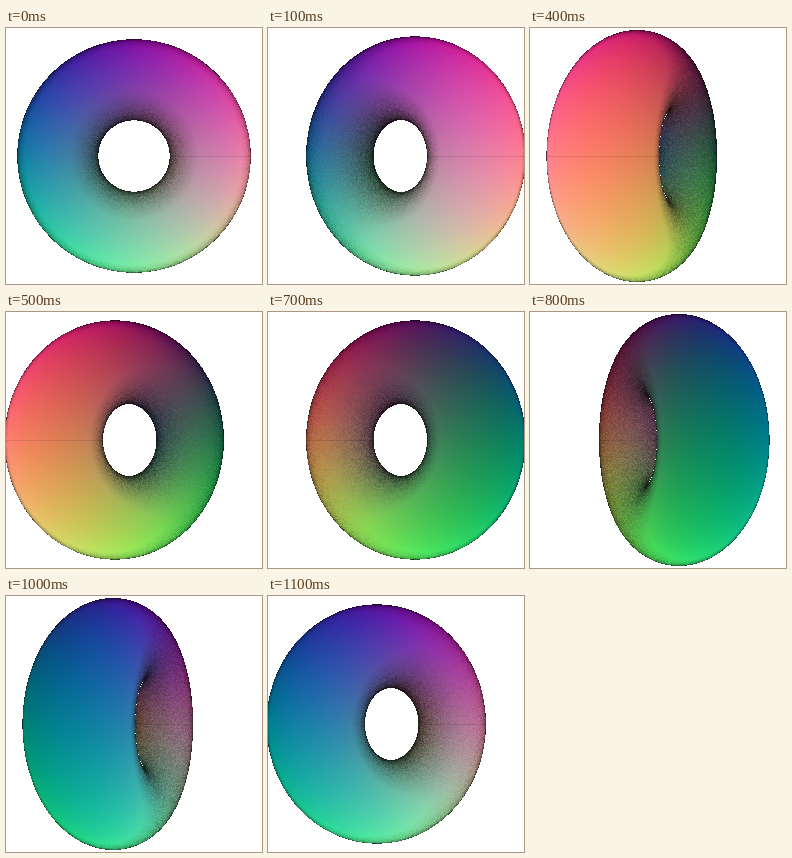
Write an HTML page with a canvas that moves like this. It is 256 px wide and 256 px high and loops after 1200 ms.

```html
<!DOCTYPE html>
<html lang="en">
<head>
<meta charset="utf-8">
<title>Turning torus</title>
<style>
  html, body { margin: 0; width: 100%; height: 100%; overflow: hidden; background: #fff; }
  canvas { display: block; width: 256px; height: 256px; }
</style>
</head>
<body>
<canvas id="stage" width="256" height="256"></canvas>
<script>
const SIZE = 256, STEPS = 12, STEP_MS = 100;
const FOCAL = 222, CAMERA = 3, TUBE = 0.51, REACH = 1.5;
const ctx = document.getElementById('stage').getContext('2d');
const poses = [];

function seeded(seed) {
  return () => {
    seed = (Math.imul(seed, 1664525) + 1013904223) >>> 0;
    return seed / 4294967296;
  };
}

// Map a coordinate within the torus to a colour channel.
const channel = v => 255 * Math.min(1, Math.max(0, (v / REACH + 1) / 2));

// Walk a ray to the torus; returns the hit distance or -1.
function trace(ox, oz, dx, dy, dz) {
  let t = 1.2;
  for (let n = 0; n < 80 && t < 5.5; n++) {
    const x = ox + dx * t, y = dy * t, z = oz + dz * t;
    const q = Math.sqrt(x * x + y * y) - 1;
    const gap = Math.sqrt(q * q + z * z) - TUBE;
    if (gap < 0.0015) return t;
    t += gap;
  }
  return -1;
}

function drawPose(step) {
  const angle = step * 2 * Math.PI / STEPS;
  const c = Math.cos(angle), s = Math.sin(angle);
  const image = ctx.createImageData(SIZE, SIZE);
  const random = seeded(step + 7);
  const ox = CAMERA * s, oz = CAMERA * c;

  for (let j = 0; j < SIZE; j++) {
    for (let i = 0; i < SIZE; i++) {
      const u = (i + 0.5 - SIZE / 2) / FOCAL;
      const v = (j + 0.5 - SIZE / 2) / FOCAL;
      const len = Math.sqrt(u * u + v * v + 1);
      const dx = (u * c - s) / len, dy = v / len, dz = (-u * s - c) / len;
      const t = trace(ox, oz, dx, dy, dz);
      if (t < 0) continue;

      const x = ox + dx * t, y = dy * t, z = oz + dz * t;
      const ring = Math.sqrt(x * x + y * y);
      const out = (ring - 1) / TUBE;
      const facing = -(dx * x / ring * out + dy * y / ring * out + dz * z / TUBE);

      // The surface darkens where its grid is packed tightly on screen.
      const depth = t / len;
      const density = depth * depth / (ring * Math.max(facing, 0.03));
      const dark = Math.min(0.75, Math.max(0, 0.32 * Math.log(density / 9)));
      let shade = (1 - dark) * (1 + (random() - 0.5) * dark);
      if (j === SIZE / 2 && x > 0) shade *= 0.88;

      const p = 4 * (j * SIZE + i);
      image.data[p] = channel(x) * shade;
      image.data[p + 1] = channel(y) * shade;
      image.data[p + 2] = channel(z) * shade;
      image.data[p + 3] = 255;
    }
  }
  return image;
}

let shown = -1;
function show(now) {
  const step = Math.floor(now / STEP_MS) % STEPS;
  if (step !== shown) {
    ctx.putImageData(poses[step], 0, 0);
    shown = step;
  }
}

for (let k = 0; k < STEPS; k++) poses.push(drawPose(k));
show(0);

let start = null;
function tick(now) {
  if (start === null) start = now;
  show(now - start);
  requestAnimationFrame(tick);
}
requestAnimationFrame(tick);
</script>
</body>
</html>
```
